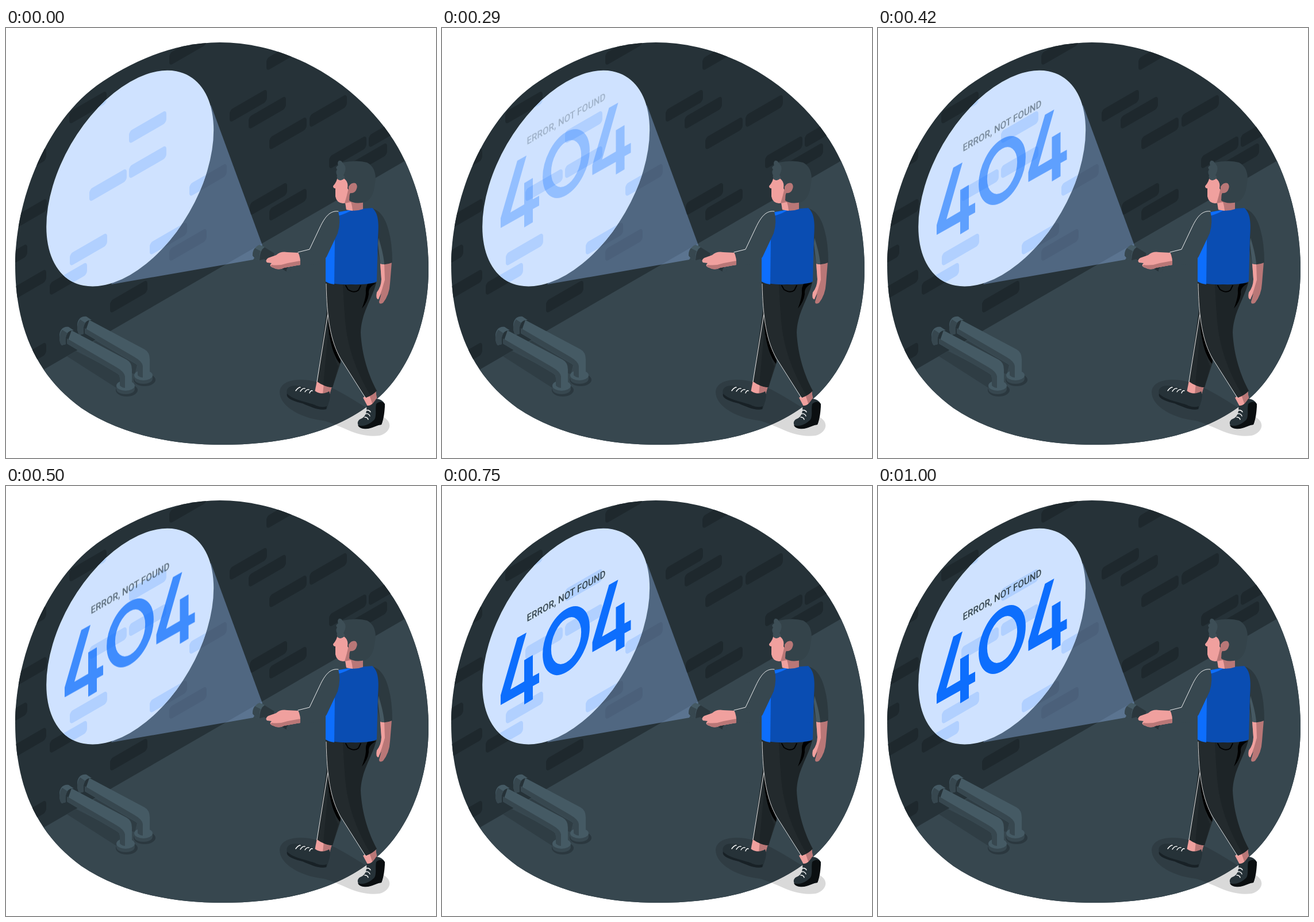
Recreate the animation shown at these times as an HTML page. Size 748 px wide and 748 px high, loop 1.04 s.

```html
<!DOCTYPE html>
<html lang="en">
<head>
<meta charset="utf-8">
<title>Error, not found</title>
<style>
html, body { margin: 0; height: 100%; overflow: hidden; background: #fff; }
svg { display: block; width: 100%; height: 100%; }
text { font: 500 17.5px Roboto, Arial, sans-serif; }
.line { fill: none; stroke-linecap: round; stroke-linejoin: round; }
</style>
</head>
<body>
<svg viewBox="0 0 748 748">
<defs>
  <clipPath id="room"><path d="M372 25C290 25 215 60 158 100C66 168 16 303 16 412C16 520 52 604 131 661C200 708 290 725 375 725C490 725 585 700 650 641C705 590 735 505 735 420C735 345 716 268 682 208C622 105 500 25 372 25Z"/></clipPath>
  <clipPath id="spot"><circle r="168" transform="matrix(.866 -.5 0 1 215.7 261.7)"/></clipPath>
  <g id="bricks"></g>
  <path id="four" d="M131 262 147 253 119 352 143 338V301l15-9v37l11-6v17l-11 6v23l-15 9v-22L102 379v-17Z"/>
  <g id="pipe">
    <ellipse cx="210" cy="630" rx="19" ry="11" fill="#2b383f"/>
    <path d="M192 623v5c0 12 32 12 32 0v-5Z" fill="#37474f"/>
    <ellipse cx="208" cy="622" rx="16" ry="9" fill="#455a64"/>
    <path d="M114 526 210 577Q219 582 219 594V622Q209 631 198 622V609Q198 603 192 600L106 549Z" fill="#455a64"/>
    <path d="M106 540 192 590Q206 598 207 606V626Q202 626 198 622V609Q198 603 192 600L106 549Z" fill="#37474f"/>
    <path d="M93 538C92 524 101 518 109 520L118 526C107 525 102 535 104 550L97 552Q93 548 93 538Z" fill="#455a64"/>
    <path d="M93 538Q94 529 98 525L107 531Q102 540 104 550L97 552Q93 548 93 538Z" fill="#37474f"/>
  </g>
</defs>

<g clip-path="url(#room)">
  <path d="M0 0H748V748H0Z" fill="#263238"/>
  <use href="#bricks" fill="#1e282d"/>
  <path d="M748 200 0 632V748H748Z" fill="#37474f"/>
  <path d="M356.5 134 446 378 430 403 183 446Z" fill="#97c2ff" fill-opacity=".37"/>
</g>

<g clip-path="url(#spot)">
  <path d="M60 60H370V460H60Z" fill="#cfe2ff"/>
  <use href="#bricks" fill="#b1d0ff"/>
</g>

<g id="message" opacity="0">
  <text transform="matrix(.866 -.5 0 1 147.5 234.5)" fill="#37474f">ERROR, NOT FOUND</text>
  <g fill="#0d6efd">
    <use href="#four"/>
    <use href="#four" x="159.5" y="-92"/>
  </g>
  <ellipse rx="38.7" ry="46.5" transform="matrix(.866 -.5 0 1 216 267)" fill="none" stroke="#0d6efd" stroke-width="17"/>
</g>

<!-- pipes -->
<path d="M106 571 122 562 200 602 226 620 192 626Z" fill="#2f3d44"/>
<path d="M132 556 156 544 228 586 224 602 204 596Z" fill="#2f3d44"/>
<use href="#pipe" x="31" y="-18"/>
<use href="#pipe"/>

<path d="M476 634C476 612 510 607 542 616C584 629 629 665 655 676C674 685 670 703 650 709C610 714 585 691 552 683C514 679 477 659 476 634Z" opacity=".15"/>

<!-- rear leg and shoe -->
<path d="M541 613 537 634 562 640 567 623Z" fill="#f0a09e"/>
<path d="M553 617 551 637 562 640 567 623Z" fill="#b97777"/>
<path d="M489 629C492 621 505 621 518 624L536 630C545 639 558 635 562 632C567 642 560 654 558 663C545 666 530 659 516 653C499 649 485 643 489 629Z" fill="#263238"/>
<path d="M489 636C500 648 527 651 540 657Q550 661 558 658L557 663C545 666 530 659 516 653C499 649 486 644 489 636Z" fill="#182126"/>
<path class="line" d="M504 631q4-6 8-6m0 7q4-6 8-5m0 6q3-5 7-4m1 6q2-5 5-4" stroke="#fff" stroke-width="1.4"/>
<path d="M559 485 541 615Q553 624 568 625L582 582 594 500Z" fill="#232a2d"/>
<path d="M563 500C567 550 570 575 578 588L568 625Q559 625 552 621Z" fill="#1d2427"/>
<path class="line" d="M560 497 541 615" stroke="#fff" stroke-width=".9"/>
<path d="M560 492C559 530 567 568 581 584L582 580C572 555 568 525 564 492Z"/>

<!-- front leg and shoe -->
<path d="M621 643 629 658 646 652 643 631Z" fill="#f0a09e"/>
<path d="M632 638 638 656 646 652 643 631Z" fill="#b97777"/>
<path d="M627 657C636 658 640 651 644 645C652 645 660 651 659 658C656 668 657 681 653 690C642 691 634 698 624 697C611 696 608 684 617 680C626 677 628 667 627 657Z" fill="#263238"/>
<path d="M644 654C650 648 656 650 659 654C659 666 657 681 653 690C643 691 634 699 622 697Q614 696 612 691C626 695 636 686 641 681C645 674 642 662 644 654Z" fill="#0b0f11"/>
<path class="line" d="M627 665q5-1 7 3m-8 3q5-1 7 4m-9 2q5 0 6 4" stroke="#fff" stroke-width="1.4"/>
<path d="M556 440C557 500 565 545 582 575L626 643Q638 639 645 631C631 605 619 570 617 530C618 492 640 468 645 438Z" fill="#1d2427"/>
<path d="M556 440C557 500 565 545 582 575L626 643 634 639C605 590 594 550 590 510Q587 470 586 445Z" fill="#232a2d"/>
<path class="line" d="M557 445C558 505 565 546 582 575L625 643" stroke="#fff" stroke-width=".8"/>
<path class="line" d="M591 448 595 455Q606 462 613 456L617 448" stroke="#000" stroke-width="1.8"/>
<path d="M630 444Q625 450 626 462Q625 473 619 488Q629 477 631 463C630 454 635 448 644 444Z"/>

<!-- far arm -->
<path d="M651 408 671 407 668 444Q667 464 656 478Q649 482 649 476L653 462 647 472Q643 471 645 460Q653 450 653 437Z" fill="#b97777"/>
<path d="M651 410 658 410 659 438 654 455 648 472Q643 471 645 460Q653 450 653 437Z" fill="#f0a09e"/>
<path d="M633 313C650 315 660 331 665 350Q672 374 672 408Q660 413 651 410L646 386 642 340Z" fill="#2c393f"/>
<path d="M647 375 651 410 658 411Q657 394 648 365Z" fill="#465962"/>

<!-- vest -->
<path d="M574 321 600 316 637 313C648 322 649 339 647 365L645 441Q633 447 600 446Q570 447 556 441V394L574 358Z" fill="#0a4db2"/>
<path d="M556 394 572 366 571 446Q562 445 556 441Z" fill="#0d6efd"/>
<path d="M574 321 603 316Q592 323 577 327Z" fill="#0d6efd"/>

<!-- head -->
<path d="M590 298 592 316Q607 320 621 315V296Z" fill="#b97777"/>
<path d="M590 304 592 316 603 318Q602 308 600 303Z" fill="#f0a09e"/>
<path d="M577 258Q576 267 569 275Q569 279 573 279V293Q575 304 586 305Q594 305 604 297L607 262Z" fill="#f0a09e"/>
<path d="M594 260 596 278Q593 292 589 305Q598 304 604 298L606 260Z" fill="#b97777"/>
<path d="M579 231Q583 230 585 234Q611 229 628 234C640 240 645 254 642 270C640 286 636 298 625 303Q606 307 597 300L598 284 594 279Q596 267 588 262Q582 267 577 263Q575 260 576 256Q573 251 576 246Q572 242 578 239Q576 234 579 231Z" fill="#34434a"/>
<path d="M585 234Q595 242 587 256Q591 260 588 262Q582 267 577 263Q575 260 576 256Q573 251 576 246Q572 242 578 239Q576 234 579 231Q583 230 585 234Z" fill="#3d4e56"/>
<path d="M596 276Q601 268 608 270Q613 274 609 282Q606 288 599 287L596 293Z" fill="#b97777"/>

<!-- flashlight -->
<path class="line" d="M450 392 490 418" stroke="#263238" stroke-width="12"/>
<path d="M441 404Q440 388 449 381L467 392 458 407 449 402Z" fill="#2b373d"/>
<path d="M429 396Q428 383 441 377L450 381Q441 387 441 404L434 402Z" fill="#455a64"/>
<path d="M429 396Q429 388 433 383L443 388Q440 394 441 404L434 402Z" fill="#37474f"/>
<ellipse cx="492" cy="420" rx="3.5" ry="6" transform="rotate(27 492 420)" fill="#37474f"/>

<!-- near arm -->
<path d="M513 391 489 390Q478 388 470 395L456 400Q450 404 454 408L462 409Q456 414 465 417Q474 422 484 417L512 412Z" fill="#f0a09e"/>
<path d="M512 405 490 409Q476 414 462 412Q458 415 465 417Q474 422 484 417L512 412Z" fill="#b97777"/>
<path d="M578 319C564 317 555 328 546 347L528 385 508 390Q513 400 512 413L542 411Q555 407 561 391L577 357Q583 336 578 319Z" fill="#37474f"/>
<path class="line" d="M578 319C564 317 555 328 546 347L528 385 508 390" stroke="#fff" stroke-width=".9"/>
</svg>

<script>
const LOOP = 1040, SLIDE = 1000, RISE = 44.9, FPS = 24;

// left x and upper-left y of each brick
const spots = [
  [214, 180], [214, 241], [145, 281], [111, 393], [76, 444], [319, 272], [250, 374],
  [284, 385], [181, 475], [389, 143], [422, 155], [458, 191], [528, 152], [562, 224],
  [598, 236], [631, 187], [424, 305], [458, 315], [284, 44], [453, 53], [110, 146],
  [5, 245], [6, 333], [-28, 412], [5, 456], [5, 583]
];
document.getElementById('bricks').innerHTML = spots.map(([x, y]) =>
  `<rect width="75" height="22" rx="6" transform="matrix(.866 -.5 0 1 ${x} ${y})"/>`).join('');

const bezier = (a, b, t) => 3 * (1 - t) ** 2 * t * a + 3 * (1 - t) * t * t * b + t ** 3;

// cubic-bezier(.36, -.01, .5, 1.38)
function ease(x) {
  if (x >= 1) return 1;
  let lo = 0, hi = 1;
  for (let i = 0; i < 24; i++) {
    const mid = (lo + hi) / 2;
    if (bezier(.36, .5, mid) < x) lo = mid; else hi = mid;
  }
  return bezier(-.01, 1.38, lo);
}

const message = document.getElementById('message');
const start = performance.now();

function draw() {
  const time = (performance.now() - start) % LOOP;
  const step = Math.floor((time + 5) * FPS / 1000);
  const p = ease(step * 1000 / FPS / SLIDE);
  message.setAttribute('transform', `translate(0 ${RISE * (p - 1)})`);
  message.setAttribute('opacity', Math.min(1, Math.max(0, p)));
  requestAnimationFrame(draw);
}
draw();
</script>
</body>
</html>
```
